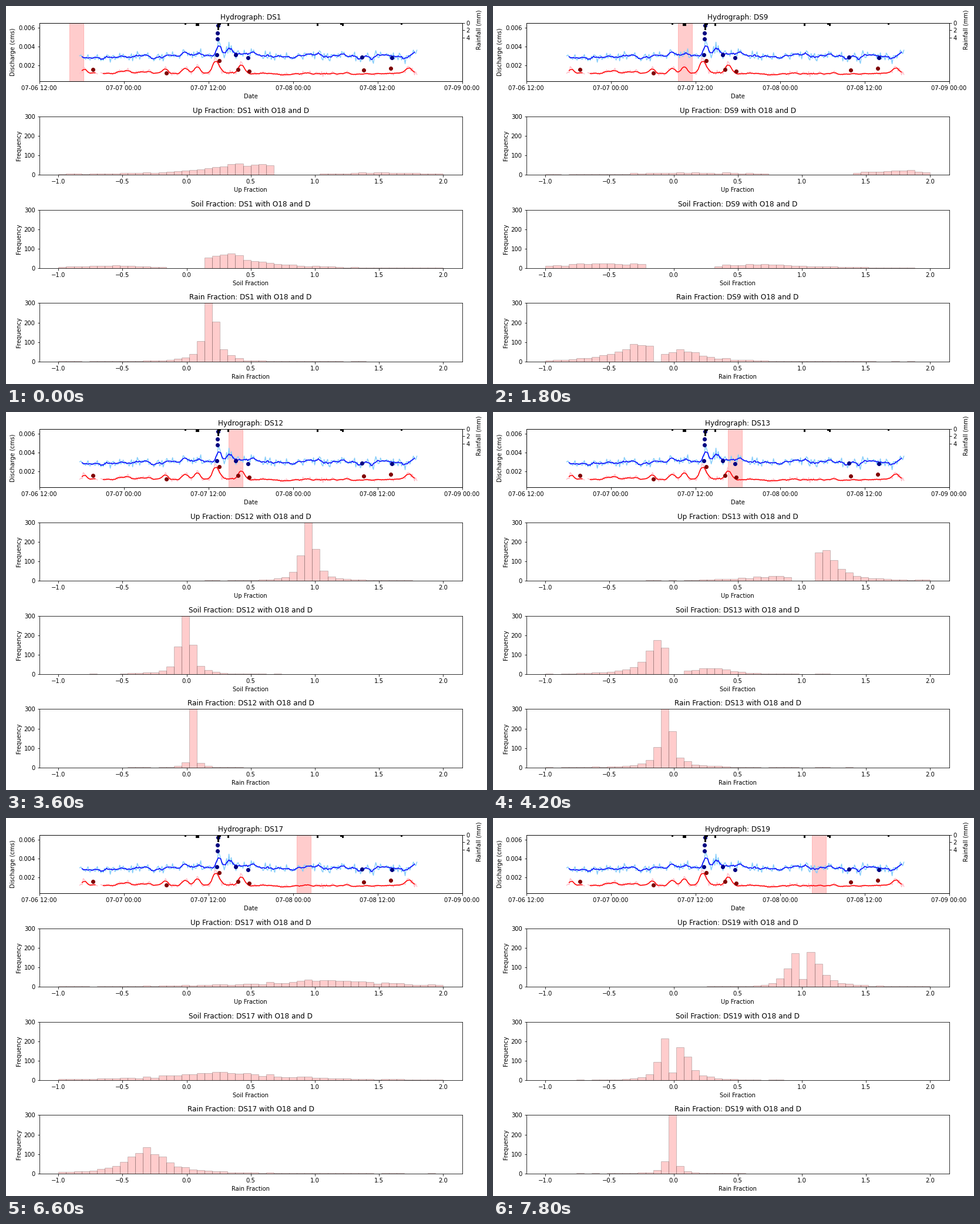
Recreate the animation shown at these times as a matplotlib script. Size 819x643 px, loop 8 s.

```python
import numpy as np
import matplotlib.pyplot as plt
from matplotlib.animation import FuncAnimation

W, H, DPI = 819, 643, 72
LEFT, BOTTOM, WIDTH, HEIGHT = 56.6, 38.24, 720, 576
PANEL = HEIGHT / 5.8
PITCH = 1.6 * PANEL
BINS = 50
EDGES = np.linspace(-1, 2, BINS + 1)
CENTERS = (EDGES[1:] + EDGES[:-1]) / 2
SAMPLES = [1, 7, 8, 9, 10, 11, 12, 13, 14, 15, 16, 17, 18, 19]
STEP_MS, TICK_MS, LOOP_MS = 600, 200, 8000

# Start of the highlighted two hours, in hours from noon, at key samples
STARTS = {1: 4.25, 9: 21.5, 12: 26.83, 13: 28.58, 19: 40.5}

# Histogram lobes per key sample: (height, peak, spread[, low limit[, high limit]])
LOBES = {
    "Up": {
        1: [(57, 0.5, 0.38, -1, 0.7), (12, 1.5, 0.4, 1.05)],
        9: [(10, 0.2, 0.6, -1, 0.72), (22, 1.75, 0.3, 1.4)],
        12: [(600, 0.955, 0.035)],
        13: [(155, 1.17, 0.12, 1.09), (23, 0.75, 0.22, -1, 0.92)],
        15: [(50, 1.35, 0.28, 1.1), (29, 0.6, 0.3, -1, 0.8)],
        17: [(33, 1.1, 0.55)],
        19: [(170, 0.94, 0.06, -1, 0.98), (44, 1.01, 0.02), (175, 1.07, 0.09, 1.04)],
    },
    "Soil": {
        1: [(70, 0.31, 0.27, 0.14), (13, -0.6, 0.4, -1, -0.17)],
        9: [(25, -0.5, 0.5, -1, -0.22), (20, 0.7, 0.4, 0.32)],
        12: [(600, -0.008, 0.033)],
        13: [(172, -0.12, 0.1, -1, -0.05), (30, 0.28, 0.18, 0.09)],
        15: [(66, -0.25, 0.28, -1, -0.16), (34, 0.32, 0.28, 0.15)],
        17: [(38, 0.3, 0.5)],
        19: [(205, -0.07, 0.05, -1, -0.04), (42, -0.01, 0.02), (175, 0.06, 0.07, 0.02)],
    },
    "Rain": {
        1: [(410, 0.185, 0.045)],
        9: [(85, -0.28, 0.2, -1, -0.16), (58, 0.06, 0.18, -0.1)],
        12: [(900, 0.05, 0.01)],
        13: [(380, -0.055, 0.045)],
        15: [(180, -0.05, 0.08), (75, 0.12, 0.06, 0.08)],
        17: [(130, -0.32, 0.16)],
        19: [(900, -0.016, 0.0145)],
    },
}

# Swells on the base flow: (hour, height in 1e-3 cms, spread in hours)
BLUE_SWELLS = [(7.3, -0.3, 0.8), (13, -0.15, 1.2), (16.3, -0.25, 0.8), (20.6, 0.35, 0.4),
               (22.3, 0.6, 0.45), (25.5, 1.35, 0.4), (26.9, 1.1, 0.6), (29.9, 0.35, 1.5),
               (36, -0.25, 0.7), (42.8, 0.3, 1), (45.4, -0.3, 0.8), (47.8, 0.15, 0.7),
               (51.5, -0.35, 0.5), (53.2, 0.25, 0.5)]
RED_SWELLS = [(6.3, 0.45, 0.4), (12.3, 0.25, 1.2), (15.4, 0.2, 0.6), (17.9, 0.4, 0.6),
              (20.8, 0.75, 0.45), (22.5, 0.85, 0.45), (25.1, 1.5, 0.6), (28.7, 1.05, 0.55),
              (34.5, -0.1, 1.5), (45, -0.1, 0.8), (52.5, 0.55, 0.7)]
NAVY_DOTS = [(25.17, 3.16), (25.25, 4.83), (25.25, 5.45), (25.33, 6.25),
             (27.83, 3.16), (29.58, 2.85), (45.75, 2.91), (50, 2.85)]
MAROON_DOTS = [(7.58, 1.61), (18, 1.24), (25.5, 2.54), (28.17, 1.61),
               (29.75, 1.42), (46, 1.55), (49.83, 1.73)]
RAINFALL = {20.7: 0.5, 22.35: 0.9, 22.55: 0.9, 25.4: 2.0, 25.65: 0.5, 26.8: 0.8,
            39.45: 0.8, 42.8: 0.5, 43.1: 0.8, 51.4: 0.5}


def lobe(height, peak, spread, low=-1, high=2):
    shape = height / (1 + ((CENTERS - peak) / spread) ** 2)
    return np.where((CENTERS > low) & (CENTERS < high), shape, 0)


def counts(name, sample):
    """Bin counts for a sample, blended between the key samples."""
    keys = list(LOBES[name])
    rows = np.array([sum(lobe(*p) for p in lobes) for lobes in LOBES[name].values()])
    mean = np.array([np.interp(sample, keys, col) for col in rows.T])
    jitter = np.random.default_rng(sample).normal(0, 0.5, BINS)
    return np.maximum(0, np.round(mean + jitter * np.sqrt(mean)))


def add_panel(row):
    y = BOTTOM + (3 - row) * PITCH
    return fig.add_axes([LEFT / W, y / H, WIDTH / W, PANEL / H])


def plot_flow(base, swells, noise, raw_color, color, gap=(0, 0)):
    """Noisy ten-minute flow with its five-point running mean."""
    t = np.arange(5.75, 53.65, 1 / 6)
    level = base + sum(h * np.exp(-((t - c) / s) ** 2) for c, h, s in swells)
    raw = level * (1 + rng.normal(0, noise, t.size))
    raw[(t > gap[0]) & (t < gap[1])] = np.nan
    mean = np.convolve(raw, np.ones(5) / 5, "valid")
    ax.plot(t, raw / 1000, color=raw_color, lw=1.5)
    ax.plot(t[2:-2], mean / 1000, color=color, lw=1.5)


rng = np.random.default_rng(7)
fig = plt.figure(figsize=(W / DPI + 1e-6, H / DPI + 1e-6), dpi=DPI, facecolor="white")

# Hydrograph
ax = add_panel(0)
band = ax.axvspan(0, 2, color="red", alpha=0.2)
plot_flow(3.05, BLUE_SWELLS, 0.09, "lightskyblue", "blue")
plot_flow(1.2, RED_SWELLS, 0.1, "pink", "red", gap=(8.3, 8.75))
for dots, color in ((NAVY_DOTS, "navy"), (MAROON_DOTS, "maroon")):
    hours, flow = np.array(dots).T
    ax.plot(hours, flow / 1000, "o", color=color, ms=6)
ax.set(xlim=(0, 60), ylim=(0.00035, 0.0065), xlabel="Date", ylabel="Discharge (cms)",
       yticks=[0.002, 0.004, 0.006])
ax.set_xticks(range(0, 61, 12),
              [f"07-{6 + h // 24:02d} {h % 24:02d}:00" for h in range(12, 73, 12)])
head = ax.set_title("", fontsize=12)

rain_ax = ax.twinx()
rain_ax.bar(list(RAINFALL), list(RAINFALL.values()), width=0.25, color="black")
rain_ax.set(ylim=(16, 0), yticks=[0, 2, 4], ylabel="Rainfall (mm)")
rain_ax.yaxis.set_label_coords(1.0335, 0.88)

# Histograms
panels = []
for row, name in enumerate(LOBES, start=1):
    hist = add_panel(row)
    bars = hist.bar(EDGES[:-1], np.zeros(BINS), width=3 / BINS, align="edge",
                    color="red", edgecolor="black", alpha=0.2)
    hist.set(xlim=(-1.15, 2.15), ylim=(0, 300), xticks=np.arange(-1, 2.1, 0.5),
             yticks=[0, 100, 200, 300], xlabel=f"{name} Fraction", ylabel="Frequency")
    panels.append((name, bars, hist.set_title("", fontsize=12)))


def update(frame):
    sample = SAMPLES[frame * TICK_MS // STEP_MS]
    head.set_text(f"Hydrograph: DS{sample}")
    band.set_x(np.interp(sample, list(STARTS), list(STARTS.values())))
    for name, bars, title in panels:
        title.set_text(f"{name} Fraction: DS{sample} with O18 and D")
        for bar, n in zip(bars, counts(name, sample)):
            bar.set_height(n)
    return []


anim = FuncAnimation(fig, update, frames=LOOP_MS // TICK_MS, interval=TICK_MS,
                     init_func=lambda: update(0), repeat=True, repeat_delay=0)
plt.show()
```
